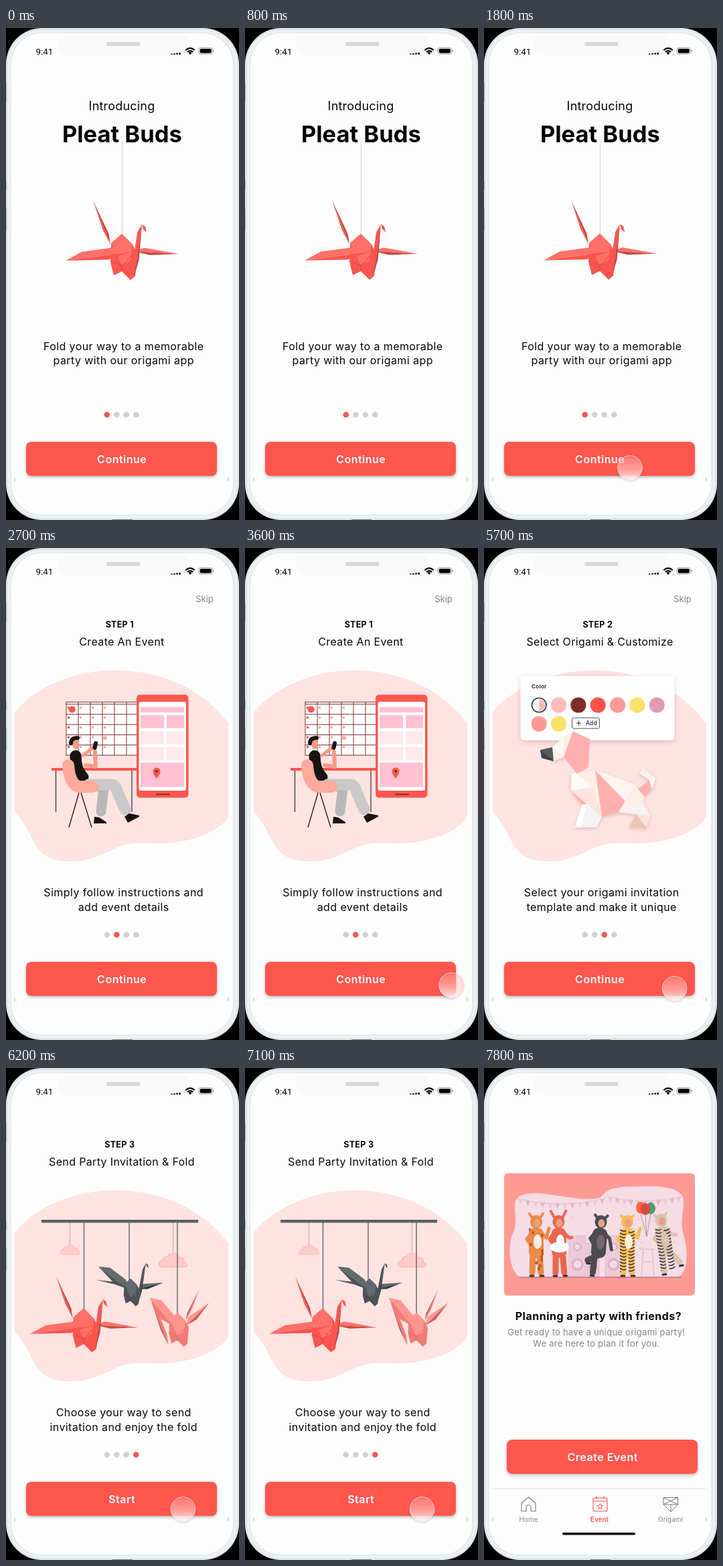
An HTML page with a canvas that plays this animation: 348 px wide and 736 px high, repeating every 8 s.

```html
<!DOCTYPE html>
<html lang="en">
<head>
<meta charset="utf-8">
<title>Origami onboarding</title>
<style>
html, body { margin: 0; width: 100%; height: 100%; overflow: hidden; background: #000; }
canvas { display: block; width: 348px; height: 736px; }
</style>
</head>
<body>
<canvas id="stage"></canvas>
<script>
const W = 348, H = 736, LOOP = 8000, TAU = Math.PI * 2;
const RED = '#ff564e', INK = '#080808', GREY = '#858585', BLUSH = '#fee3e1', PAPER = '#fdfdfd';
const dpr = Math.max(1, window.devicePixelRatio || 1);
const makeCanvas = el => {
  el.width = W * dpr;
  el.height = H * dpr;
  el.getContext('2d').scale(dpr, dpr);
  return el;
};
const main = makeCanvas(document.getElementById('stage')).getContext('2d');
const layer = makeCanvas(document.createElement('canvas'));
let g = main;

// Drawing helpers
const times = (n, f) => { for (let i = 0; i < n; i++) f(i); };
const fill = (color, d) => { g.fillStyle = color; g.fill(new Path2D(d)); };
const poly = (color, pts) => fill(color, 'M' + pts.join(' ') + 'Z');
function line(color, w, d, cap = 'butt') {
  g.strokeStyle = color;
  g.lineWidth = w;
  g.lineCap = cap;
  g.lineJoin = 'round';
  g.stroke(new Path2D(d));
}
const limb = (color, w, d) => line(color, w, d, 'round');
function box(color, x, y, w, h, r = 0) {
  g.fillStyle = color;
  g.beginPath();
  g.roundRect(x, y, w, h, r);
  g.fill();
}
function frame(color, lw, x, y, w, h, r = 0) {
  g.strokeStyle = color;
  g.lineWidth = lw;
  g.beginPath();
  g.roundRect(x, y, w, h, r);
  g.stroke();
}
function oval(color, x, y, rx, ry = rx) {
  g.fillStyle = color;
  g.beginPath();
  g.ellipse(x, y, rx, ry, 0, 0, TAU);
  g.fill();
}
function text(s, x, y, size, { color = INK, weight = 400, gap = 0.42, align = 'center' } = {}) {
  g.font = `${weight} ${size}px Inter, sans-serif`;
  g.letterSpacing = gap + 'px';
  g.textAlign = align;
  g.fillStyle = color;
  g.fillText(s, x, y);
}
function shadowed(color, blur, dy, draw) {
  g.save();
  g.shadowColor = color;
  g.shadowBlur = blur * dpr;
  g.shadowOffsetY = dy * dpr;
  draw();
  g.restore();
}
function placed(x, y, scale, draw, turn = 0) {
  g.save();
  g.translate(x, y);
  g.rotate(turn);
  g.scale(scale, scale);
  draw();
  g.restore();
}
const random = seed => () => (seed = seed * 16807 % 2147483647) / 2147483647;

// Shared parts
function button(label, x = 30, y = 619) {
  shadowed('rgba(70,50,50,.35)', 4, 2, () => box(RED, x, y, 285, 51, 8));
  text(label, x + 143.2, y + 32, 16, { color: '#fff', weight: 600, gap: 0.5 });
}
function dots(active) {
  times(4, i => oval(i === active ? RED : '#d0d0d0', 150.8 + i * 14.5, 578.5, 4.3));
}
const blob = () => fill(BLUSH, 'M13 246C45 206 105 183 163 183C235 183 295 213 332 262V403C315 425 285 437 245 441' +
  'C222 443 210 440 190 442C155 446 140 469 97 469C37 469 46 430 13 394Z');
function step(n, title, lines, label, skip) {
  blob();
  if (skip) text('Skip', 296.5, 81, 13, { color: GREY, gap: 0 });
  text('STEP ' + n, 169.8, 119, 12.5, { weight: 700, gap: 0.3 });
  text(title, 173, 146, 16, { gap: 0.35 });
  lines.forEach((s, i) => text(s, 175.7, 521 + i * 21.5, 16));
  dots(n);
  button(label);
}

// Origami: a two-tone blade from base to tip, split along its crease
function blade([bx, by], [tx, ty], w, upper, lower, far = 0.25) {
  const dx = tx - bx, dy = ty - by, len = Math.hypot(dx, dy), side = dx < 0 ? 1 : -1;
  const at = (u, off) => [bx + dx * u - dy / len * off * side, by + dy * u + dx / len * off * side];
  poly(upper, [at(0, 0), at(0.22, w), at(far, w), at(1, 0)]);
  poly(lower, [at(0, 0), at(0.36, -w * 0.7), at(1, 0)]);
}
function crane(x, y, s, [light, mid, dark], { tail, left, right, neck, hub = 14, span = 10 }) {
  const toward = (p, bx, by) => [Math.sign(p[0]) * bx, by];
  placed(x, y, s, () => {
    blade(toward(tail, 17, 16), tail, 3.5, dark, mid);
    blade([18, 26], right, span * 0.6, light, dark);
    poly(mid, [[0, 0], [-16, 14], [-17, 42], [-12, 62], [0, 56], [13, 69], [20, 63], [23, 30], [16, 16]]);
    poly(light, [[0, 0], [16, 16], [13, 40], [0, 47], [-16, 14]]);
    line(dark, 1, 'M-13 42L0 48L14 33M0 48V56');
    blade(toward(neck, 18, 66), neck, 5, mid, dark, 0.85);
    placed(...neck, 1, () => poly(mid, [[0, 0], [5, 3], [7, 12], [2, 7]]));
    blade([hub, 27], left, span, light, mid, 0.74);
  });
}
const REDS = ['#ff7069', '#fa554e', '#c44a45'];
const redCrane = (x, y, s) => crane(x, y, s, REDS, { tail: [-43, -50], left: [-84, 40], right: [85, 30], neck: [30, -14] });

// Screens
function intro(t) {
  text('Introducing', 173, 123, 18, { gap: 0.2 });
  line('#d2d2d2', 1, 'M173.5 170V309');
  text('Pleat Buds', 173.3, 171, 34.5, { weight: 700, gap: 0, color: '#000' });
  redCrane(173, 308 - 0.4 * Math.min(1, t / 1800), 1);
  text('Fold your way to a memorable', 175.7, 482, 16);
  text('party with our origami app', 175.7, 503, 16);
  dots(0);
  button('Continue');
}

function calendar() {
  const brown = '#7b302a', col = 18, row = 15.3;
  box('#fff', 89.5, 230, 108, 80);
  times(6, i => {
    line(brown, 1, `M${90 + i * col} 230V310M89.5 ${233.5 + i * row}H197`);
    if (i < 5) times(4, c => oval(c ? '#f3a5a2' : '#d95751', 93.5 + c * col, 239 + i * 14.7, 1.8));
  });
  line(brown, 1, 'M89.5 230.5H197');
  oval(RED, 98.7, 241.5, 5);
  oval('#ffa8a2', 148, 284, 3);
}
function handset() {
  box(RED, 195, 219.5, 77.5, 154, 5);
  box('#fff', 198.5, 230, 70.5, 133, 3);
  box('#ffc1d3', 201, 238, 65, 8);
  times(6, i => box(i < 2 ? '#ffc1d3' : '#ffe8ec', i % 2 ? 240 : 201, 250 + (i >> 1) * 24, i % 2 ? 26 : 35, 19.5));
  box('#ffc1d3', 201, 321, 65, 36.5);
  fill(RED, 'M225 345Q219.500 338 219.500 334A5.500 5.500 0 0 1 230.500 334Q230.500 338 225 345Z');
  oval('#7b302a', 225, 334, 2);
  box('#7b302a', 224, 367.5, 21, 2, 1);
}
function sitter() {
  const skin = '#f79a88', black = '#191414';
  line('#2c2424', 1.4, 'M109 366L94 418M112 366L128 418');
  limb(black, 17, 'M104 311Q104 332 115 343');
  limb(skin, 6, 'M119 325L134 327L133 305');
  limb(skin, 5, 'M115 310L131 298');
  oval(skin, 104, 293, 5, 8);
  limb(black, 6, 'M97 292Q97 284 107 284');
  limb(black, 6, 'M134 292L132.500 299');
  limb('#b8b8b8', 15, 'M123 353L146 359L142 394');
  limb('#c9c9c9', 17, 'M125 354H158Q164 355 167 366L178 391');
  fill(black, 'M132 402L139 403L150 410V412H131Z');
  fill(black, 'M177 402L184 397L199 400V402L182 411Z');
  limb('#ffaa9a', 18, 'M93 325Q95 352 108 357H129');
}
function createEvent() {
  step(1, 'Create An Event', ['Simply follow instructions and', 'add event details'], 'Continue', true);
  calendar();
  line('#3a2a2a', 1.2, 'M74.500 332V395M188 332V395');
  box(RED, 68, 329, 129, 4);
  handset();
  sitter();
}

function palette() {
  shadowed('rgba(120,70,70,.22)', 8, 3, () => box('#fff', 54.5, 191.5, 230, 96, 5));
  text('Color', 71, 210, 8, { weight: 700, gap: 0.3, align: 'left', color: '#333' });
  const tones = ['#fff', '#ffb9b8', '#812d27', '#ff524c', '#ff9993', '#fbe069', '#eba6bf', '#ff9993', '#fbe069'];
  tones.forEach((c, i) => oval(c, 82.2 + (i % 7) * 29.35, i < 7 ? 235 : 263, 11.6));
  fill('#ffb9b8', 'M82.200 226A9 9 0 0 1 82.200 244Z');
  frame('#3a4a52', 1.8, 71.5, 224.3, 21.4, 21.4, 10.7);
  times(5, i => frame('#c8749a', 0.6, 256.3 - i * 2, 233 - i * 2, 4 + i * 4, 4 + i * 4, 2 + i * 2));
  frame('#47545b', 1, 131.5, 254, 41, 16, 3);
  line('#333', 1, 'M138 262H145M141.500 258.500V265.500');
  text('Add', 152, 265, 8.3, { weight: 600, gap: 0.2, align: 'left', color: '#34464e' });
}
// Folded facets that share named corners
const corners = Object.fromEntries((
  'a84,302 b102,298 c104,319 d86,314 e120,282 f133,274 g158,286 h156,328 i139,338 j119,313 ' +
  'k130,337 l166,332 m163,358 n130,363 o226,354 p211,379 q201,395 r176,402 s146,384 t154,383 u145,418 v168,418 w136,418 ' +
  'x240,372 y234,380 z248,400 A227,398 B217,418 C243,418 D231,337 E238,328 F256,344 G251,361 H230,361 I247,347'
).split(' ').map(p => [p[0], p.slice(1)]));
const facet = (color, names) => poly(color, [...names].map(n => corners[n]));
function dog() {
  const cream = '#fdeee6', pale = '#fff3f2', pink = '#ffb0ae';
  shadowed('rgba(150,90,90,.3)', 5, 2, () => {
    facet(cream, 'klozCBAqrvwsn');
    facet(cream, 'EFGxHID');
    facet(cream, 'befjc');
  });
  const folds = {
    knmi: '#fffafa', lop: pale, lpqr: pink, nmr: '#fde4dd', nrs: pink, stuw: '#fff', trvu: '#f3f3f3', oxyq: cream,
    yzAq: '#f3f3f3', ABC: '#e8c5b5', AzC: '#fbe4da', IGxH: pink, IFG: '#fff7f3', abcd: '#515b60', acd: '#394348',
    bej: '#fff8f5', fghij: pink
  };
  for (const names in folds) facet(folds[names], names);
}
function customize() {
  step(2, 'Select Origami & Customize', ['Select your origami invitation', 'template and make it unique'], 'Continue', true);
  palette();
  dog();
}

function cloud(x, y, s) {
  placed(x, y, s, () => {
    const d = 'M-12 7C-17 7 -17 0 -11 0C-11 -4 -8 -5 -6 -4C-3 -10 6 -9 6 -3C11 -4 13 0 12 2C17 3 16 7 12 7Z';
    fill('#ffcbc8', d);
    line('#f8b4b0', 0.8, d);
  });
}
function sendInvite() {
  step(3, 'Send Party Invitation & Fold', ['Choose your way to send', 'invitation and enjoy the fold'], 'Start', false);
  line('#b9aaaa', 1, 'M95.500 231V266M249.500 231V275');
  cloud(96, 272, 0.97);
  cloud(249.5, 288, 1.37);
  line('#555d60', 1.3, 'M116.500 231V361M184 231V317M256 231V367');
  box('#5b6265', 53, 227, 234, 4.5);
  redCrane(116, 359.6, 0.953);
  crane(186, 315, 0.6, ['#626a6e', '#4b5356', '#343a3d'],
    { tail: [-87, 3], left: [-80, -30], right: [82, 10], neck: [38, -38], hub: -4, span: 15 });
  crane(256, 366, 0.74, ['#ff958e', '#f17b74', '#c4665f'],
    { tail: [44, -47], left: [-56, -30], right: [64, -20], neck: [-52, -21], hub: -8, span: 15 });
}

// One costumed guest, standing on the origin; all share a figure and differ in pose and pattern
function guest(x, suit, { belly = suit, mark, spots, ears = 3, tilt = 0, kick = 0, reach = 0, hop = 0 }) {
  const dark = '#3a3135', rnd = random(x);
  placed(x, 312 - hop, 1, () => {
    limb(suit, 9, `M-5 -35L-6 -6M5 -35L${7 + kick} ${-6 - Math.abs(kick) * 0.8}`);
    limb(dark, 3, `M-9 -1H-4M${6 + kick} ${-1 - Math.abs(kick) * 0.8}h5`);
    limb(suit, 5, `M-7 -66L-14 -56L-7 -46M7 -66L15 -58L19 ${-58 - reach}`);
    box(suit, -11, -73, 22, 45, 9);
    if (mark) {
      g.save();
      g.clip(new Path2D('M-11 -73H11V-7H-11Z'));
      times(14, i => spots
        ? oval(mark, rnd() * 20 - 10, -70 + i * 4.5, 2, 2.4)
        : line(mark, 1.5, `M-11 ${-70 + i * 4.8}q7 4 9 1M11 ${-68 + i * 4.8}q-7 4 -9 1`));
      g.restore();
    }
    oval(belly, 2, -52, 6, 11);
    limb(suit, 4, `M-6 -88L${-8 - ears / 3} ${-88 - ears}M6 -88L${8 + ears / 3} ${-88 - ears}`);
    oval(suit, 0, -82, 9, 10);
    oval('#e9a184', 1, -80, 5, 6);
  }, tilt);
}
function bunting(x0, x1, y, sag, n) {
  line('#dba9bd', 0.6, `M${x0} ${y}Q${(x0 + x1) / 2} ${y + sag * 2} ${x1} ${y}`);
  times(n, i => {
    const u = (i + 0.5) / n, x = x0 + (x1 - x0) * u, top = y + 4 * sag * u * (1 - u);
    poly(i % 2 ? '#e3b5c8' : '#edc5d4', [[x - 3.5, top], [x + 3.5, top], [x, top + 8]]);
  });
}
function speaker(x, y, w, h) {
  box('#edcad7', x, y, w, h);
  frame('#dfb3c5', 0.8, x, y, w, h);
  times(2, i => {
    const cy = y + h * (0.27 + i * 0.43), r = w * (0.26 + i * 0.12);
    oval('#dfb3c5', x + w / 2, cy, r);
    oval('#f3dae4', x + w / 2, cy, r * 0.6);
  });
}
function partyCard() {
  box('#ff9993', 30, 157.5, 285, 183, 6);
  fill('#f5dce5', 'M46 205C46 187 70 186 90 188C125 193 150 199 174 194C186 176 207 178 235 177C268 176 298 180 298 199' +
    'C298 219 292 231 299 253C306 278 303 307 290 313H54C37 303 35 267 43 247C51 231 45 222 46 205Z');
  bunting(49, 182, 195, 8, 12);
  bunting(184, 296, 192, 7, 11);
  const rnd = random(41);
  times(28, () => oval('#e5b9cc', 54 + rnd() * 236, 208 + rnd() * 65, 1));
  speaker(127, 251, 25, 61);
  speaker(154, 262, 18, 50);
  speaker(181, 251, 25, 61);
  line('#dfb3c5', 1, 'M234 271H255M238 271L235 312M251 271L254 312M237 290H253');
  line('#93616b', 1, 'M53 313H295');
  guest(78, '#e98a45', { belly: '#f5ede9', mark: '#b9582b', spots: true, ears: 6, reach: 14 });
  guest(113, '#e9674e', { belly: '#fff', ears: 10, tilt: -0.02 });
  oval('#fff', 113, 268, 14, 8);
  guest(168, '#4e4a51', { belly: '#73686f', ears: 4, tilt: 0.08, kick: -22, reach: -16 });
  guest(214, '#f4bd55', { belly: '#fff1d5', mark: '#3a3135', reach: 14 });
  ['#f06b3f', '#4d9f6e', '#df463f'].forEach((c, i) => {
    const x = [234, 249, 241][i];
    line('#80707a', 0.6, `M${x} 218L243 252`);
    oval(c, x, 209 + i, 7, 9);
  });
  guest(276, '#dac3b2', { mark: '#3a3135', tilt: -0.14, kick: 12, hop: 3 });
}
function tabs() {
  const tone = '#777';
  line('#e6e6e6', 1, 'M13 629.500H332');
  line(tone, 1.1, 'M56 651L66.500 642L77 651V663H70V656Q66.500 651 63 656V663H56Z');
  frame(RED, 1.1, 163, 643, 21, 20, 3);
  line(RED, 1.1, 'M163 648H184M168 640.500V645M179 640.500V645');
  const star = Array.from({ length: 10 }, (_, i) => {
    const r = i % 2 ? 2.1 : 4.4, a = i * TAU / 10;
    return [173.5 + r * Math.sin(a), 655.8 - r * Math.cos(a)];
  });
  line(RED, 1, 'M' + star.join(' ') + 'Z');
  line(tone, 1, 'M268 642.500H289.500V653L279 664L268 653ZM268 642.500L289.500 653H268L289.500 642.500M279 653V664');
  ['Home', 'Event', 'Origami'].forEach((s, i) =>
    text(s, 66.5 + i * 106, 679, 10, { gap: 0, color: i === 1 ? RED : GREY, weight: i === 1 ? 600 : 400 }));
  box('#000', 117, 695, 109, 3.4, 1.7);
}
function home() {
  partyCard();
  text('Planning a party with friends?', 171, 377, 16, { weight: 700, gap: 0.5 });
  text('Get ready to have a unique origami party!', 167.7, 400, 13, { color: GREY, gap: 0.26 });
  text('We are here to plan it for you.', 167.7, 416.5, 13, { color: GREY, gap: 0.26 });
  button('Create Event', 34, 556);
  tabs();
}

// Device and status bar
function device() {
  box('#000', 0, 0, W, H);
  const rings = ['#dfe3e6', '#e9edef', '#f0f3f4', '#e6eaec'];
  rings.forEach((c, i) => box(c, i * 2, i * 2, W - i * 4, H - i * 4, 54 - i * 2));
  box(PAPER, 8, 8, W - 17, H - 16, 46);
  [[82, 28], [229, 13], [270, 33]].forEach(([y, h]) => box('#a9afb3', 0, y, 1, h));
  box('#777', 159, 735, 30, 1);
  box('#b5b5b5', 12.5, 672, 1, 6);
  box('#b5b5b5', 331.5, 672, 1, 6);
}
function statusBar() {
  fill('#f9f9f9', 'M76 12H272V27Q272 41 258 41H90Q76 41 76 27Z');
  box('#d8d8d8', 150, 21, 50.5, 6, 3);
  g.font = '400 13.4px Roboto, sans-serif';
  g.letterSpacing = '0px';
  g.textAlign = 'left';
  g.fillStyle = '#000';
  g.fillText('9:41', 44.5, 39.6);
  times(4, i => box('#111', 246 + i * 4.1, 38.3 - i * 0.5, 2.7, 1.4 + i * 0.5, 0.6));
  line('#000', 2.2, 'M268.300 33.200Q275 27.200 281.700 33.200M270.800 36Q275 32.300 279.200 36');
  poly('#000', [[272.5, 37.3], [275, 35.6], [277.5, 37.3], [275, 40]]);
  frame('#999', 1, 288, 29.5, 20.5, 9.5, 3);
  box('#000', 289.7, 31, 17.2, 6.6, 1.8);
  box('#999', 309.3, 32.5, 1.2, 3.5, 0.6);
}

// Timeline: screens dissolve in, touches fade in, glide to their target and fade out
const FADE = 150, GLIDE = 520;
const screens = [[0, intro], [1950, createEvent], [3750, customize], [5850, sendInvite], [7260, home]];
const touches = [
  { start: 1280, end: 2600, from: [218, 683], to: [218, 658] },
  { start: 3080, end: 4250, from: [304, 654], to: [308, 654] },
  { start: 5440, end: 7410, from: [305, 658], to: [264.5, 660] }
];
const clamp = u => Math.min(1, Math.max(0, u));
const ease = u => u * u * (3 - 2 * u);

function drawTouch({ start, end, from, to }, t) {
  if (t < start || t > end) return;
  const u = ease(clamp((t - start) / GLIDE));
  const [x, y] = from.map((v, i) => v + (to[i] - v) * u);
  g.save();
  g.globalAlpha = clamp(Math.min(t - start, end - t) / 120);
  const shade = g.createLinearGradient(0, y - 19, 0, y + 19);
  shade.addColorStop(0, 'rgba(250,190,187,.3)');
  shade.addColorStop(0.55, 'rgba(252,205,202,.6)');
  shade.addColorStop(1, 'rgba(255,242,241,.92)');
  shadowed('rgba(60,40,40,.5)', 3, 1, () => frame('rgba(245,222,221,.9)', 1, x - 18.3, y - 18.3, 36.6, 36.6, 18.3));
  oval(shade, x, y, 18.5);
  g.restore();
}

function render(t) {
  g = main;
  device();
  const n = screens.findLastIndex(([start]) => t >= start);
  const [start, show] = screens[n];
  const mix = n ? clamp((t - start) / FADE) : 1;
  if (mix < 1) {
    screens[n - 1][1](start);
    g = layer.getContext('2d');
    box(PAPER, 0, 0, W, H);
    show(t);
    g = main;
    g.save();
    g.globalAlpha = mix;
    g.beginPath();
    g.rect(13, 60, 319, 645);
    g.clip();
    g.drawImage(layer, 0, 0, W, H);
    g.restore();
  } else {
    show(t);
  }
  touches.forEach(touch => drawTouch(touch, t));
  statusBar();
}

const begin = performance.now();
function tick() {
  render((performance.now() - begin) % LOOP);
  requestAnimationFrame(tick);
}
tick();
</script>
</body>
</html>
```
